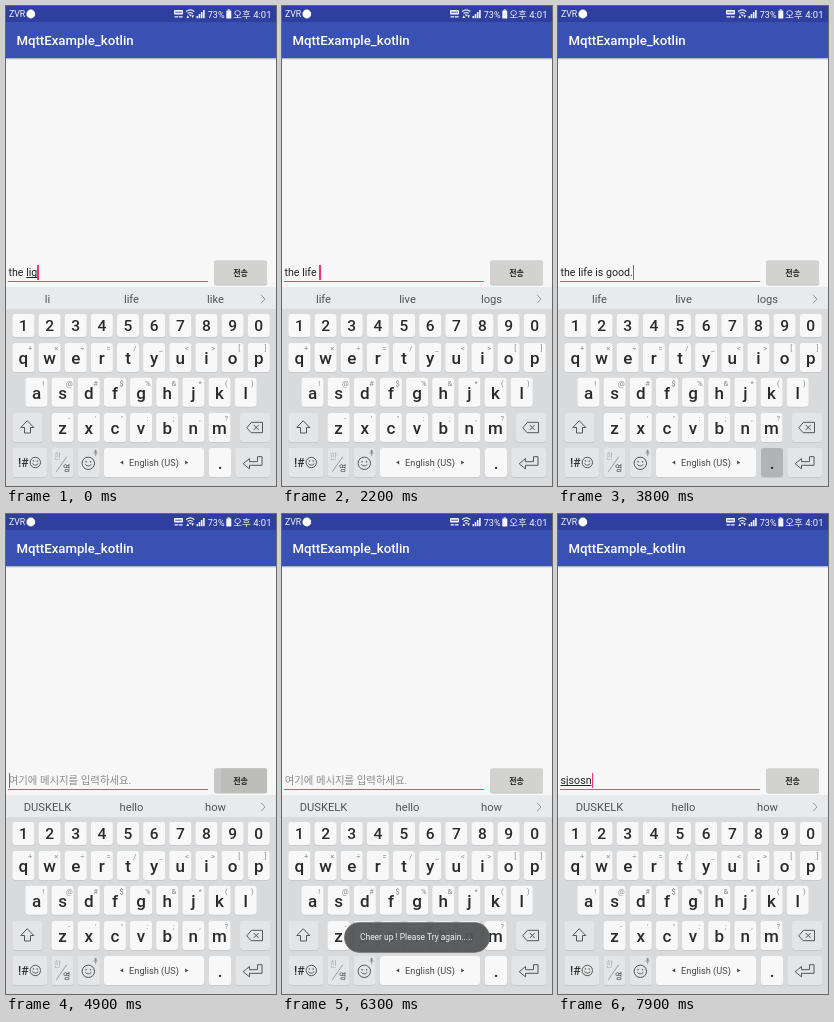
These frames come from a looping animation (270x480 px, 8000 ms). An HTML page:

```html
<!DOCTYPE html>
<html lang="ko">
<head>
<meta charset="utf-8">
<style>
html, body { margin: 0; width: 100%; height: 100%; overflow: hidden; background: #f7f7f7; }
body { position: relative; }
svg { position: absolute; left: 0; top: 0; }
svg, #field { font-family: Roboto, "Noto Sans CJK KR", "Noto Sans CJK", sans-serif; }
#field { position: absolute; left: 2.5px; top: 260px; font-size: 10.67px; line-height: 13px; white-space: pre; color: #222; }
u { text-underline-offset: 1px; text-decoration-thickness: 1px; text-decoration-skip-ink: none; }
#caret { position: absolute; top: -1px; width: 1.4px; height: 15px; background: #f5336a; }
</style>
</head>
<body>
<svg id="stage" width="270" height="480" viewBox="0 0 270 480"></svg>
<div id="field"><span id="done"></span><u id="draft"></u><i id="caret"></i></div>
<script>
const $ = id => document.getElementById(id);

const rect = (x, y, w, h, fill, r = 0, more = '') =>
  `<rect x="${x}" y="${y}" width="${w}" height="${h}" rx="${r}" fill="${fill}" ${more}/>`;
const text = (s, x, y, size, fill, anchor = 'middle', more = '') =>
  `<text x="${x}" y="${y}" font-size="${size}" fill="${fill}" text-anchor="${anchor}" ${more}>${s}</text>`;
const line = (d, color = '#555', w = 1) =>
  `<path d="${d}" fill="none" stroke="${color}" stroke-width="${w}" stroke-linejoin="round" stroke-linecap="round"/>`;
const shape = (d, fill) => `<path d="${d}" fill="${fill}"/>`;

const LIGHT = '#f8f8f8', SOFT = '#e4e5e6', PRESSED = '#b1b3b5', MEDIUM = 'font-weight="500"';

function key(id, x, y, w, h, fill = LIGHT) {
  return rect(x, y + 0.8, w, h, '#c3c4c6', 3) +
    rect(x, y, w, h, fill, 3, `data-key="${id}" data-fill="${fill}"`);
}

function letterRow(letters, marks, x0, y) {
  return [...letters].map((c, i) => {
    const x = x0 + 26.15 * i;
    const mark = marks[i].replace('&', '&amp;').replace('<', '&lt;');
    return key(c, x - 11, y, 22, 29) + text(c, x, y + 21.3, 17, '#2a2a2a', 'middle', MEDIUM) +
      text(mark, x + 6.7, y + 8, 7.5, '#888');
  }).join('');
}

function smiley(x, y, r) {
  const e = r * 0.36;
  return `<circle cx="${x}" cy="${y}" r="${r}" fill="none" stroke="#555"/>` +
    `<circle cx="${x - e}" cy="${y - 1.5}" r=".8" fill="#555"/><circle cx="${x + e}" cy="${y - 1.5}" r=".8" fill="#555"/>` +
    line(`M${x - 2.8} ${y + 1.3}q2.8 3 5.6 0`, '#555', 0.9);
}

function statusBar() {
  const ink = '#f4f5fb', bg = '#2f3f9f';
  return rect(0, 0, 270, 16, bg) +
    text('ZVR', 3, 11.4, 8.8, ink, 'start') +
    '<circle cx="24.8" cy="8" r="4.4" fill="#fff"/>' +
    rect(168, 4, 9, 4.5, ink, 1) + line('M169.5 6.2h6', bg, 0.9) +
    line('M169 10.8h2.6m1.6 0h3', ink, 1.2) +
    line('M180.5 5.3q3.7-2.8 7.4 0M182 7.3q2.2-1.6 4.4 0', ink, 1.1) + shape('M182.8 8.6h2.8l-1.4 1.8z', ink) +
    shape('M181.8 9.2l1.4 2.8h-2.8zM186.6 12l1.4-2.8h-2.8z', ink) +
    [0, 1, 2, 3].map(i => rect(190.5 + 2.2 * i, 10 - 2 * i, 1.6, 2.2 + 2 * i, ink)).join('') +
    text('73%', 201.8, 11.6, 9, ink, 'start') +
    rect(220.3, 4.5, 5, 8, ink, 0.6) + rect(221.7, 3.4, 2.2, 1.2, ink) +
    text('오후 4:01', 265.5, 11.6, 9.5, ink, 'end');
}

function keyboard() {
  const digits = [...'1234567890'].map((c, i) => {
    const x = 17.4 + 26.15 * i;
    return key(c, x - 11, 308, 22, 23) + text(c, x, 325.2, 15.5, '#2a2a2a', 'middle', MEDIUM);
  }).join('');
  return rect(0, 281, 270, 199, '#d9dadb') + rect(0, 281, 270, 22, '#e9eaeb') +
    [41.5, 125.5, 209.5].map(x => text('', x, 297, 11.2, '#505254', 'middle', 'class="hint"')).join('') +
    line('M255.3 289l3.6 4-3.6 4', '#999') + digits +
    letterRow('qwertyuiop', '+×÷=/_<>[]', 17.4, 337) +
    letterRow('asdfghjkl', '!@#$%&*()', 30.5, 371.7) +
    letterRow('zxcvbnm', `-'":;,?`, 56.6, 407) +
    key('shift', 6.4, 407, 30, 29, SOFT) + line('M21.5 415l6.3 6.5h-3.3v5.5h-6v-5.5h-3.3z') +
    key('back', 234, 407, 30, 29, SOFT) + line('M241 421.5l4.5-5.2h11v10.4h-11zM248 419.3l4.4 4.4m0-4.4l-4.4 4.4') +
    key('sym', 6.4, 442, 35, 29, SOFT) + text('!#', 17.3, 461, 12, '#333', 'middle', MEDIUM) + smiley(29.3, 456.5, 5.2) +
    key('lang', 45.6, 442, 22, 29, SOFT) + text('한', 51.5, 452.5, 7.5, '#aaa') +
    line('M50.5 465.5l10-14.5', '#888', 0.8) + text('영', 60.8, 465.3, 8, '#444') +
    key('mic', 71.8, 442, 22, 29, SOFT) + smiley(82.3, 457.3, 6.2) +
    rect(88.6, 443.8, 2, 4, '#888', 1) + line('M87.7 446.9q1.9 3 3.8 0M89.6 448.5v1.4', '#888', 0.6) +
    key(' ', 98, 442, 100, 29) + text('English (US)', 148, 460, 9.2, '#444') +
    shape('M117.2 454.5v4l-3-2zM179.2 454.5v4l3-2z', '#444') +
    key('.', 203, 442, 22, 29) + text('.', 214, 462.5, 17, '#2a2a2a', 'middle', MEDIUM) +
    key('enter', 229.3, 442, 34.7, 29, SOFT) + line('M237.5 457.5l6-5v3.2h8v-5h4.5v8.6h-12.5v3.2z');
}

$('stage').innerHTML =
  rect(0, 0, 270, 480, '#f7f7f7') +
  rect(0, 52, 270, 1, '#b4b8c8') + rect(0, 53, 270, 1, '#e2e3e8') +
  rect(0, 16, 270, 36, '#3a51b4') + statusBar() +
  text('MqttExample_kotlin', 10.4, 38.8, 13.2, '#fff', 'start', MEDIUM) +
  text('여기에 메시지를 입력하세요.', 2.7, 270, 10.4, '#8c8c8c', 'start', 'id="empty"') +
  rect(2, 275, 200, 1, '#f5416f') +
  rect(208.3, 255, 52.7, 24.6, '#bdbdbd', 2) + rect(208.3, 254.3, 52.7, 24.4, '#d2d2d1', 2, 'id="send"') +
  rect(215, 254.3, 46, 24.4, '#bcbcbb', 2, 'id="ripple"') +
  text('전송', 234.6, 269.6, 8, '#222', 'middle', 'font-weight="700"') +
  keyboard() +
  `<g id="toast">${rect(62.4, 408.4, 145.2, 30, '#545556', 15, 'fill-opacity=".95" stroke="#757677" stroke-width=".8"')}` +
  `${text('Cheer up ! Please Try again.....', 78, 426.2, 8.45, '#f2f2f2', 'start')}</g>`;

// Each step: time in tenths of a second, committed text, underlined draft, held key.
const steps = [
  [0, 'the ', 'lig'], [1, 'the ', 'lig', ' '], [2, 'the life ', '', ' '], [3, 'the life  '],
  [13, 'the life  ', '', 'back'], [14, 'the life ', '', 'back'], [16, 'the life '],
  [24, 'the life ', '', 'i'], [25, 'the life ', 'i', 's'], [26, 'the life ', 'is', ' '],
  [27, 'the life is ', '', 'g'], [28, 'the life is ', 'g', 'o'], [29, 'the life is ', 'go'],
  [30, 'the life is ', 'go', 'o'], [31, 'the life is ', 'goo', 'd'], [32, 'the life is ', 'good'],
  [34, 'the life is ', 'good', '.'], [35, 'the life is good.'], [38, 'the life is good.', '', '.'],
  [39, 'the life is good..'], [40, 'the life is good..', '', '.'], [41, 'the life is good...'],
  [48, '']
];
const tail = 'sjsosn';
for (let i = 0; i <= tail.length; i++) steps.push([73 + i, '', tail.slice(0, i), tail[i]]);

const caretOff = [[8, 11], [19, 22], [46, 48], [53, 58], [63, 68], [72, 74]];
const words = [[0, 'li life like'], [6, 'life live logs'], [48, 'DUSKELK hello how']];
const latest = (list, n) => list.filter(e => e[0] <= n).pop();
const keys = [...document.querySelectorAll('[data-key]')];
const hints = [...document.querySelectorAll('.hint')];

function draw(n) {
  const [, done, draft = '', held] = latest(steps, n);
  $('done').textContent = done;
  $('draft').textContent = draft;
  $('empty').style.display = done + draft ? 'none' : '';
  $('caret').style.visibility = caretOff.some(([a, b]) => n >= a && n < b) ? 'hidden' : 'visible';
  for (const k of keys) k.setAttribute('fill', k.dataset.key === held ? PRESSED : k.dataset.fill);
  latest(words, n)[1].split(' ').forEach((w, i) => hints[i].textContent = w);
  const sending = n >= 47 && n < 51;
  $('send').setAttribute('fill', sending ? '#c7c7c6' : '#d2d2d1');
  $('ripple').style.display = sending ? '' : 'none';
  $('toast').setAttribute('opacity', Math.max(0, Math.min(1, (n - 50) / 3, (74 - n) / 5)));
}

let start, last;
function tick(now) {
  start ??= now;
  const n = Math.floor((now - start) % 8000 / 100);
  if (n !== last) draw(last = n);
  requestAnimationFrame(tick);
}
draw(0);
requestAnimationFrame(tick);
</script>
</body>
</html>
```
